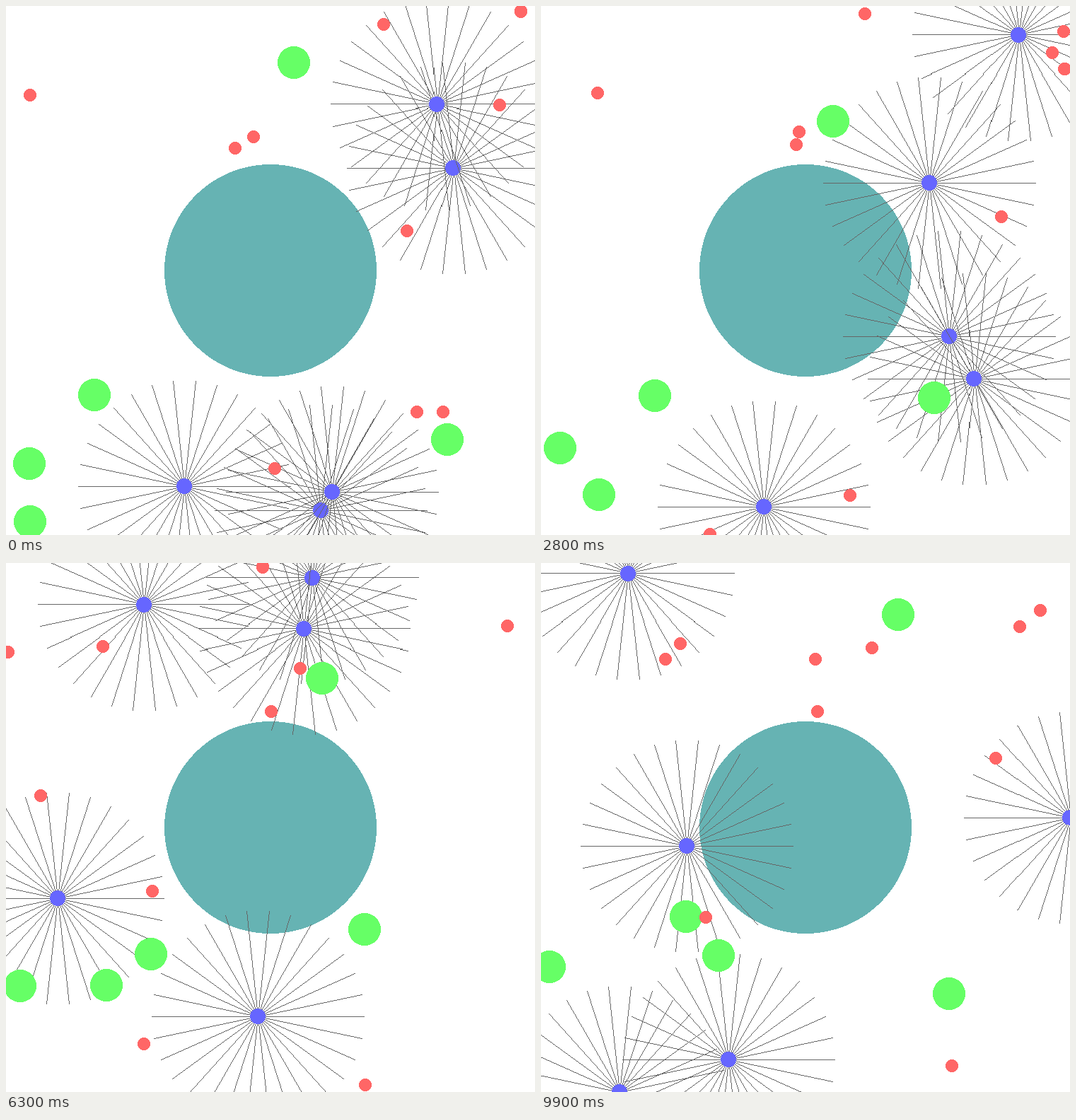
Write a matplotlib script that moves like this. It is 748 px wide and 748 px high and loops after 10000 ms.

```python
import numpy as np
import matplotlib.pyplot as plt
from matplotlib.animation import FuncAnimation
from matplotlib.colors import to_rgba

SIZE, FRAMES, INTERVAL = 748, 100, 100
HUB, HUB_R = np.array([374.0, 374.0]), 150
HUNTER_R, FOOD_R, POISON_R = 11, 23, 9
RAYS, REACH, TOP_SPEED = 30, 150, 3.5
TEAL, BLUE, GREEN, RED, GRAY = "#66b3b3", "#6666ff", "#66ff66", "#ff6666", "#666666"

# Waypoints of each hunter, back to front, at shared steps
STEPS = np.array([0, 19, 38, 53, 72, 85, 99])
ROUTES = [
    [(445, 713), (319, 724), (288, 658), (1, 455), (221, 518), (538, 533), (748, 360)],
    [(252, 679), (392, 606), (748, 338), (564, 496), (191, 731), (181, 595), (206, 400)],
    [(461, 687), (532, 692), (688, 300), (634, 76), (227, 0), (6, 3), (123, 15)],
    [(632, 229), (541, 318), (551, 143), (408, 42), (25, 121), (48, 357), (265, 702)],
    [(609, 139), (645, 66), (705, 28), (698, 63), (157, 149), (40, 372), (111, 748)],
]

# Starting place and speed: x, y, vx, vy
FOOD = [
    (407, 80, 0.21, 2.95), (125, 550, 1.27, 0.05), (33, 647, -0.21, -0.77),
    (33.5, 729.3, 1.73, 2.7), (624, 613, -2.42, -2.1),
]
POISON = [
    (33.5, 126, 1.65, -0.12), (349.5, 185, 0.41, 0.39), (581, 574, 0.345, 2.01),
    (380, 654.5, 2.03, 1.325), (324.5, 201, 1.45, -0.82), (728, 8, 0.4, 1),
    (698, 140, 0.91, -2.64), (567, 318, 3, -0.71), (534, 26, -2.71, -0.53),
    (618, 574, -0.33, -1.82),
]

rng = np.random.default_rng(8)


def glide(points):
    """Smooth cubic path through the waypoints, held inside the stage."""
    t, p = STEPS, np.array(points, float)
    m = np.empty_like(p)
    m[1:-1] = (p[2:] - p[:-2]) / (t[2:] - t[:-2])[:, None]
    m[0] = (p[1] - p[0]) / (t[1] - t[0])
    m[-1] = (p[-1] - p[-2]) / (t[-1] - t[-2])
    step = np.arange(FRAMES)
    i = np.clip(np.searchsorted(t, step, side="right") - 1, 0, len(t) - 2)
    h = (t[i + 1] - t[i])[:, None]
    u = (step - t[i])[:, None] / h
    path = (p[i] + (p[i + 1] - p[i]) * u * u * (3 - 2 * u)
            + h * (m[i] * u * (1 - u) ** 2 - m[i + 1] * u * u * (1 - u)))
    return np.clip(path, 0, SIZE)


def rebirth(radius):
    """Random free place and random velocity."""
    pos = HUB
    while np.hypot(*(pos - HUB)) < HUB_R + 2 * radius:
        pos = rng.uniform(0, SIZE, 2)
    return pos, rng.uniform(-TOP_SPEED, TOP_SPEED, 2)


def drift(start, radius, hunters=()):
    """Straight motion that bounces off the edges and the hub.

    Touching a hunter sends the drifter to a new random place."""
    pos, vel = np.array(start[:2], float), np.array(start[2:], float)
    path = [pos]
    for step in range(1, FRAMES):
        pos = pos + vel
        vel = np.where((pos < 0) & (vel < 0) | (pos > SIZE) & (vel > 0), -vel, vel)
        gap = pos - HUB
        dist = np.hypot(*gap)
        inward = vel @ gap / dist
        if dist < HUB_R + radius - 1 and inward < 0:
            vel = vel - 2 * inward * gap / dist
        if any(np.hypot(*(h[step] - pos)) < radius + HUNTER_R for h in hunters):
            pos, vel = rebirth(radius)
        path.append(pos)
    return np.array(path)


def paint(mask, color):
    sprite = np.zeros(mask.shape + (4,))
    sprite[mask] = to_rgba(color)
    return sprite


def disc(radius, color):
    g = np.arange(-radius, radius) + 0.5
    return paint(g[:, None] ** 2 + g ** 2 < radius ** 2, color)


def fan():
    """One-pixel rays around a centre pixel."""
    mask = np.zeros((2 * REACH + 1, 2 * REACH + 1), bool)
    for a in np.arange(RAYS) * 2 * np.pi / RAYS:
        end = np.round(REACH * np.array([np.cos(a), np.sin(a)]))
        n = int(abs(end).max()) + 1
        x, y = np.round(np.linspace((0, 0), end, n)).astype(int).T
        mask[y + REACH, x + REACH] = True
    return paint(mask, GRAY)


fig = plt.figure(figsize=(SIZE / 100, SIZE / 100), dpi=100, facecolor="white")
ax = fig.add_axes([0, 0, 1, 1])
actors = []


def place(image, center):
    h, w = image.get_array().shape[:2]
    left, top = np.round(center) - (w // 2, h // 2)
    image.set_extent((left, left + w, top + h, top))


def add(sprite, path):
    """Put a sprite on top of the earlier ones."""
    image = ax.imshow(sprite, interpolation="nearest", aspect="auto",
                      zorder=len(actors))
    actors.append((image, path))


hunters = [glide(route) for route in ROUTES]
add(disc(HUB_R, TEAL), np.tile(HUB, (FRAMES, 1)))
for path in hunters:
    add(fan(), path)
    add(disc(HUNTER_R, BLUE), path)
for start in FOOD:
    add(disc(FOOD_R, GREEN), drift(start, FOOD_R))
for start in POISON:
    add(disc(POISON_R, RED), drift(start, POISON_R, hunters))

ax.set_xlim(0, SIZE)
ax.set_ylim(SIZE, 0)
ax.axis("off")


def draw(step):
    for image, path in actors:
        place(image, path[step])
    return [image for image, _ in actors]


anim = FuncAnimation(fig, draw, frames=FRAMES, interval=INTERVAL,
                     repeat=True, repeat_delay=0, blit=False)
plt.show()
```
